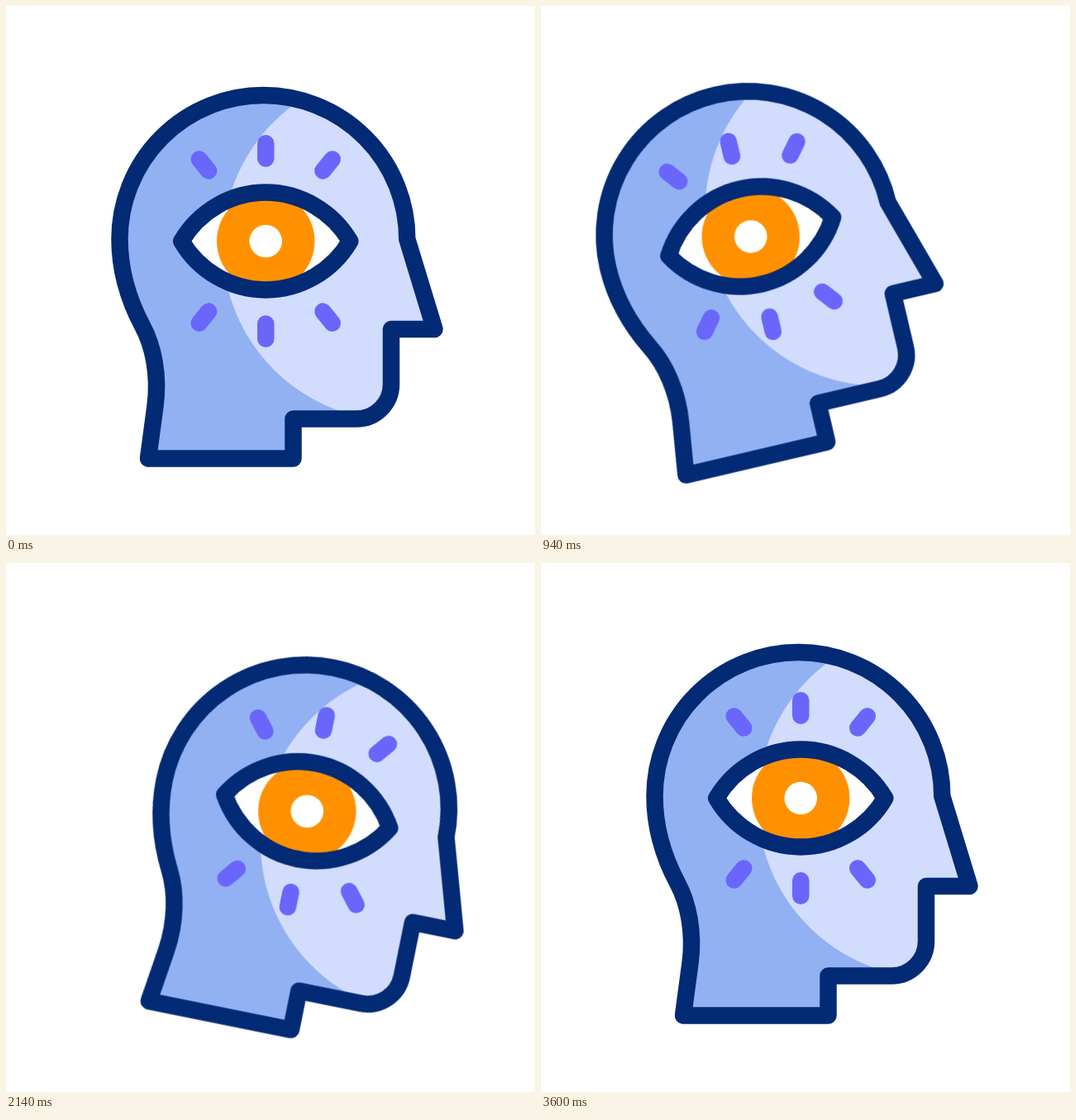
Recreate the animation shown at these times as an HTML page without scripts. Size 640 by 640 pixels, loop 3.62 s.

```html
<!DOCTYPE html>
<html lang="en">
<head>
<meta charset="utf-8">
<title>Mind's eye</title>
<style>
  :root {
    --loop: 3.62s;
    --cycle: calc(var(--loop) / 3);
    --ease: cubic-bezier(.3333, 0, .6667, 1);
    --line: 20.5;
  }
  html, body { margin: 0; width: 100%; height: 100%; overflow: hidden; background: #fff; }
  svg { display: block; width: 100%; height: 100%; }

  .outline { fill: none; stroke: #032a75; stroke-width: var(--line); stroke-linejoin: round; }
  .head { transform-origin: 260px 543px; animation: sway var(--loop) var(--ease) infinite; }
  .lid { animation: blink var(--cycle) var(--ease) -6.7ms infinite; }
  .rays {
    fill: none; stroke: #6a66fa; stroke-width: var(--line); stroke-linecap: round;
    stroke-dasharray: 1 2; animation: shine var(--cycle) var(--ease) -6.7ms infinite;
  }

  /* Swings take 1.2 s each, then a 20 ms rest */
  @keyframes sway {
    0%, 99.448%, 100% { transform: rotate(0deg); }
    33.149% { transform: rotate(-15deg); }
    66.298% { transform: rotate(15deg); }
  }

  @keyframes blink {
    0%, 66.3%, 100% { d: path("M-102 0C-81 -36 -42 -59 0 -59S81 -36 102 0C81 36 42 59 0 59S-81 36 -102 0Z"); }
    33.15% { d: path("M-102 0C-81 6 -42 10 0 10S81 6 102 0C81 10 42 16.5 0 16.5S-81 10 -102 0Z"); }
  }

  /* Each ray empties outward, stays hidden, then grows from its inner end */
  @keyframes shine {
    0%, 66.3%, 100% { stroke-dashoffset: 0; }
    9.12% { stroke-dashoffset: -1; }
    9.13%, 49.72% { stroke-dashoffset: -1.5; }
    49.73% { stroke-dashoffset: 1; }
  }
</style>
</head>
<body>
<svg viewBox="0 0 640 640">
  <defs>
    <path id="profile" d="M172 547.5H347.5V499.5H424A42 42 0 0 0 466 457.5V391H518.5L485.3 282
      A173.9 173.9 0 0 0 137.5 282C137.5 320 148 355 165 387C178 411 185.5 446 180.5 484Z"/>
    <clipPath id="inHead"><use href="#profile"/></clipPath>
    <clipPath id="inEye"><path class="lid"/></clipPath>
    <path id="sideRay" pathLength="1" d="M0 -109.4v-18.3"/>
    <g id="fan">
      <path pathLength="1" d="M0 -99.75v-18.5"/>
      <use href="#sideRay" transform="rotate(39.1)"/>
      <use href="#sideRay" transform="rotate(-39.1)"/>
    </g>
  </defs>

  <g class="head">
    <use href="#profile" fill="#92b1f3"/>
    <circle cx="474" cy="290" r="212" fill="#d2dcfd" clip-path="url(#inHead)"/>
    <use href="#profile" class="outline"/>

    <g transform="translate(314.25 284.5)">
      <g class="rays">
        <use href="#fan"/>
        <use href="#fan" transform="scale(1 -1)"/>
      </g>
      <g clip-path="url(#inEye)">
        <rect x="-110" y="-70" width="220" height="140" fill="#fff"/>
        <circle r="59.2" fill="#ff9100"/>
        <circle r="19.8" fill="#fff"/>
      </g>
      <path class="lid outline"/>
    </g>
  </g>
</svg>
</body>
</html>
```
